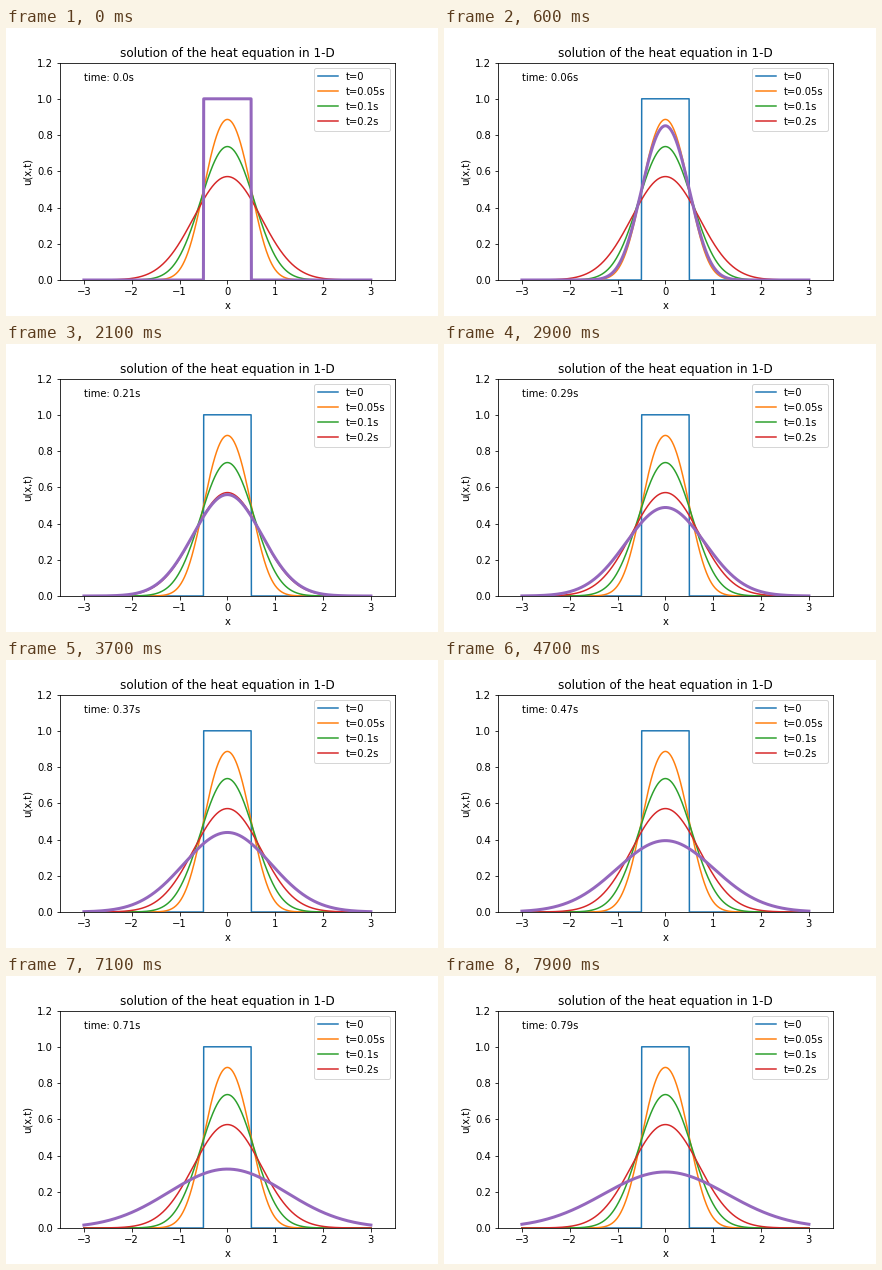
A matplotlib script for the animation above (8000 ms loop, 432 by 288 pixels).

```python
import math

import matplotlib.pyplot as plt
import numpy as np
from matplotlib.animation import FuncAnimation

FRAMES = 80
INTERVAL = 100  # ms
DT = 0.01  # simulated seconds per frame

erf = np.vectorize(math.erf)
x = np.linspace(-3, 3, 1000)


def heat(t):
    """Diffusion of a unit box on [-0.5, 0.5] after time t."""
    if t == 0:
        return np.where(np.abs(x) <= 0.5, 1.0, 0.0)
    width = math.sqrt(4 * t)
    return 0.5 * (erf((x + 0.5) / width) - erf((x - 0.5) / width))


plt.rcParams.update({"font.family": "DejaVu Sans", "font.size": 10})
fig = plt.figure(figsize=(6, 4), dpi=72, facecolor="white")
fig.subplots_adjust(left=0.125, right=0.9, bottom=0.125, top=0.88)
ax = fig.add_subplot(xlim=(-3.5, 3.5), ylim=(0, 1.2))
ax.set_title("solution of the heat equation in 1-D")
ax.set_xlabel("x")
ax.set_ylabel("u(x,t)")

for t, label in ((0, "t=0"), (0.05, "t=0.05s"), (0.1, "t=0.1s"), (0.2, "t=0.2s")):
    ax.plot(x, heat(t), lw=1.5, label=label)
ax.legend(loc="upper right")

curve, = ax.plot(x, heat(0), color="C4", lw=3)
clock = ax.text(-3, 1.1, "")


def update(i):
    t = round(i * DT, 2)
    curve.set_ydata(heat(t))
    clock.set_text(f"time: {float(t)}s")
    return curve, clock


anim = FuncAnimation(fig, update, frames=FRAMES, interval=INTERVAL,
                     repeat=True, repeat_delay=0)
plt.show()
```
